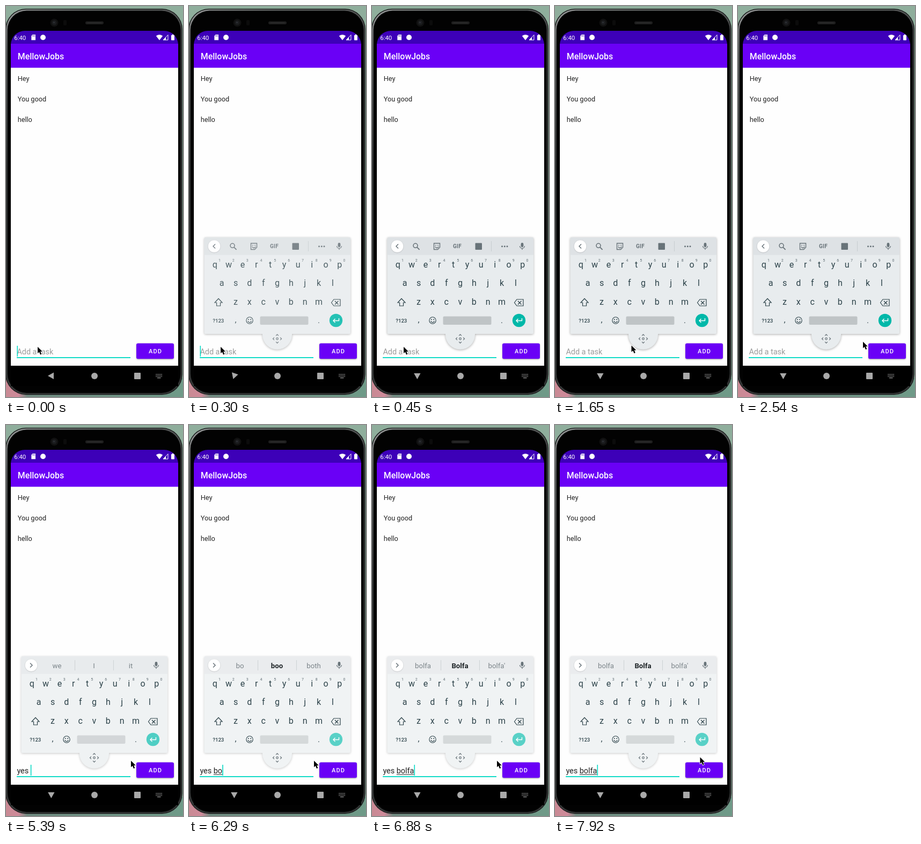
These frames come from a looping animation (330x725 px, 8 s). An HTML page with a canvas:

```html
<!DOCTYPE html>
<html lang="en">
<head>
<meta charset="utf-8">
<title>To-do list</title>
<style>
html, body { margin: 0; width: 100%; height: 100%; overflow: hidden; background: #8fae9c; }
canvas { display: block; width: 330px; height: 725px; }
</style>
</head>
<body>
<canvas id="stage"></canvas>
<script>
const W = 330, H = 725, LOOP = 8000;
const ratio = window.devicePixelRatio || 1;
const FONT = 'Roboto, "Noto Sans", sans-serif';
const PURPLE = '#6a00f6', TEAL = '#14dbc8', INK = '#2c4249', ICON = '#687379';

function layer(canvas) {
  canvas.width = W * ratio;
  canvas.height = H * ratio;
  const ctx = canvas.getContext('2d');
  ctx.scale(ratio, ratio);
  return ctx;
}
const screen = layer(document.getElementById('stage'));
const keys = layer(document.createElement('canvas'));
let c = screen;

// Timelines: [start in ms, value]
const typed = [[0, ''], [4490, 'ye'], [4790, 'yes'], [5240, 'yes '], [5690, 'yes b'],
  [6290, 'yes bo'], [6440, 'yes bol'], [6590, 'yes bolf'], [6880, 'yes bolfa']];
const caret = [[0, 1], [450, 0], [900, 1], [1500, 0], [1950, 1], [2540, 0], [2990, 1],
  [3440, 0], [4040, 1], [7330, 0], [7780, 1]];
const hints = [[0, null], [4940, ['yes', '*yes', 'Yes']], [5240, ['we', 'I', 'it']],
  [5840, ['be', '*but', 'by']], [6290, ['bo', '*boo', 'both']],
  [6440, ['bol', '*bold', 'bolt']], [6590, ['bolf', '*bold', 'bolt']],
  [6880, ['bolfa', '*Bolfa', "bolfa'"]]];
const keyAlpha = [[0, 0], [150, 0.35], [300, 0.85], [450, 1]];
const paleness = [[0, 0], [5240, 0.15], [5390, 0.31], [5540, 0.35]];
const backTurn = [[0, 0], [150, 0.3], [300, 0.8], [450, 1]];
const pointer = [[0, [58.5, 631.5]], [1500, [78, 632]], [1650, [142, 629]], [1800, [212, 624]],
  [1950, [232.5, 622]], [7780, [254, 618]], [7920, [270, 615.5]]];

function at(line, t) {
  let value = line[0][1];
  for (const [start, v] of line) if (t >= start) value = v;
  return value;
}

function box(x, y, w, h, r, fill) {
  c.beginPath();
  c.roundRect(x, y, w, h, r);
  c.fillStyle = fill;
  c.fill();
}
function disc(x, y, r, fill) {
  c.beginPath();
  c.arc(x, y, r, 0, 7);
  c.fillStyle = fill;
  c.fill();
}
function ring(x, y, r, color, width) {
  c.beginPath();
  c.arc(x, y, r, 0, 7);
  c.strokeStyle = color;
  c.lineWidth = width;
  c.stroke();
}
function trace(points, close) {
  c.beginPath();
  for (let i = 0; i < points.length; i += 2) c.lineTo(points[i], points[i + 1]);
  if (close) c.closePath();
}
function poly(points, fill) {
  trace(points, true);
  c.fillStyle = fill;
  c.fill();
}
function line(points, color, width, close) {
  trace(points, close);
  c.strokeStyle = color;
  c.lineWidth = width;
  c.stroke();
}
function text(str, x, y, size, color, weight = 400, align = 'left', spacing = 0) {
  c.font = `${weight} ${size}px ${FONT}`;
  c.letterSpacing = spacing + 'px';
  c.textAlign = align;
  c.fillStyle = color;
  c.fillText(str, x, y);
  c.letterSpacing = '0px';
}
function shadow(color, blur, dy) {
  c.shadowColor = color;
  c.shadowBlur = blur * ratio;
  c.shadowOffsetY = dy * ratio;
}
function noShadow() { shadow('transparent', 0, 0); }

// Mixes an rgb triple with white.
function pale(rgb, amount) {
  return `rgb(${rgb.map(v => Math.round(v + (255 - v) * amount))})`;
}
function gradient(x, y, stops) {
  const g = c.createLinearGradient(0, 0, x, y);
  stops.forEach(([pos, color]) => g.addColorStop(pos, color));
  return g;
}

function drawPhone() {
  c.fillStyle = '#8fae9c';
  c.fillRect(0, 0, W, H);
  c.fillStyle = gradient(W, 0, [[0, '#c98a94'], [0.07, '#cf8a9a'], [0.12, '#6f8a80'], [1, '#6f9a88']]);
  c.fillRect(0, 690, W, 35);
  box(-1, 5, 330, 716, 38, '#1d1f1f');
  box(0.5, 6.5, 327, 713, 37, gradient(120, 240, [[0, '#a2a4a4'], [0.3, '#6a6c6c'], [1, '#3b3d3d']]));
  box(2.5, 8.5, 323.5, 709.5, 36, '#0b0c0c');
  box(4, 10, 320.5, 706.5, 35, '#020202');
  disc(90, 31, 7.5, '#101010');
  disc(90, 31, 4.5, '#1b1c1e');
  disc(89.5, 30.5, 1.6, '#2e3136');
  box(107, 26, 6, 10, 2, '#0b0b0b');
  box(148, 28.5, 34, 5.5, 2.7, '#1e1e1e');
  box(151, 30.5, 28, 1.5, 0.7, '#2c2c2c');
}

function drawStatus() {
  box(9, 46, 312, 26, [26, 26, 0, 0], '#3d00b8');
  text('6:40', 15.3, 62.6, 11.4, '#fff', 400);
  poly([49.5, 53, 55, 53, 55, 63.2, 47.3, 63.2, 47.3, 55.5], '#fff');
  for (const x of [49.4, 51.2, 53]) box(x, 54.3, 0.8, 2.2, 0, '#3d00b8');
  disc(69, 58.3, 5, '#fff');
  c.beginPath();
  c.moveTo(286, 63.5);
  c.lineTo(279.8, 55.6);
  c.quadraticCurveTo(286, 50.8, 292.2, 55.6);
  c.fillStyle = '#fff';
  c.fill();
  line([302, 53.6, 302, 63, 293, 63], '#fff', 1, true);
  poly([298, 57.6, 298, 63, 293, 63], '#fff');
  box(308, 54, 6, 9.6, 0.8, '#fff');
  box(309.7, 52.7, 2.6, 2, 0, '#fff');
}

function drawApp() {
  c.fillStyle = '#fefefe';
  c.fillRect(9, 70, 312, 597);
  c.fillStyle = PURPLE;
  c.fillRect(9, 70, 312, 44.5);
  text('MellowJobs', 21.8, 98.7, 15.9, '#fff', 500);
  ['Hey', 'You good', 'hello'].forEach((item, i) =>
    text(item, 21.7, 138.6 + 38.1 * i, 12.7, '#222'));
  shadow('rgba(0,0,0,.35)', 2.5, 1);
  box(243, 625.4, 70, 28.8, 3, PURPLE);
  noShadow();
  text('ADD', 266, 644, 11.1, '#fff', 500, 'left', 1);
}

function drawInput(t) {
  const str = at(typed, t), x = 20.4, size = 14.4;
  c.fillStyle = TEAL;
  c.fillRect(20, 651, 212, 2);
  if (!str) text('Add a task', x, 646, size, '#9b9b9b');
  text(str, x, 646, size, '#222');
  const end = x + c.measureText(str).width;
  const word = str.lastIndexOf(' ') + 1;
  if (word < str.length) {
    const start = x + c.measureText(str.slice(0, word)).width;
    c.fillRect(start, 647.6, end - start, 1);
  }
  if (at(caret, t)) {
    c.fillStyle = TEAL;
    c.fillRect(end, 630, 1.7, 20);
  }
}

function drawNav(t) {
  const gray = '#a9a9a9', dim = '#9a9a9a';
  c.fillStyle = '#000';
  c.fillRect(9, 667, 312, 38);
  c.save();
  c.translate(84.3, 685.7);
  c.rotate(-Math.PI / 2 * at(backTurn, t));
  poly([-6.3, 0, 4.7, -6.2, 4.7, 6.2], gray);
  c.restore();
  disc(165, 686, 6, gray);
  box(239, 680, 12, 12, 1, gray);
  for (let row = 0; row < 3; row++)
    for (let i = 0; i < 6; i++) box(279.3 + i * 2.1, 682.2 + row * 2.2, 1.2, 1.2, 0, dim);
  box(282, 689, 6.5, 1.2, 0, dim);
}

function drawTools() {
  line([49, 441.5, 45, 445.5, 49, 449.5], ICON, 1.5);
  ring(81, 444.3, 4, ICON, 1.6);
  line([84, 447.3, 88.5, 451.8], ICON, 1.8);
  line([115.5, 440, 126.5, 440, 126.5, 447.5, 122.5, 451.5, 115.5, 451.5], ICON, 1.4, true);
  disc(118.8, 443.7, 0.9, ICON);
  disc(123.2, 443.7, 0.9, ICON);
  c.beginPath();
  c.arc(121, 445.5, 3, 0.2, 2.94);
  c.stroke();
  text('GIF', 159, 449.2, 10, ICON, 700, 'center', 0.3);
  box(192.5, 439.5, 12.5, 12.5, 1, ICON);
  c.fillStyle = '#c7cdd0';
  c.fillRect(222, 436, 1, 19);
  for (const x of [242.5, 247.3, 252]) disc(x, 445.7, 1.5, ICON);
}

function drawHints(words) {
  line([45, 441.5, 49, 445.5, 45, 449.5], ICON, 1.5);
  words.forEach((word, i) => {
    const bold = word[0] === '*';
    text(bold ? word.slice(1) : word, [95, 164, 232.5][i], 451, 13.2,
      bold ? '#1d2326' : '#7b8489', bold ? 700 : 400, 'center');
  });
  c.fillStyle = '#cdd2d4';
  c.fillRect(128, 436, 1, 19);
  c.fillRect(200, 436, 1, 19);
}

function drawKeyIcons(fade) {
  // microphone
  box(277.6, 439, 4.8, 8.2, 2.4, ICON);
  c.beginPath();
  c.arc(280, 445, 4.4, 0, Math.PI);
  c.strokeStyle = ICON;
  c.lineWidth = 1.3;
  c.stroke();
  line([280, 449.4, 280, 452], ICON, 1.3);
  // shift
  line([55, 542.5, 62, 550, 58.5, 550, 58.5, 556, 51.5, 556, 51.5, 550, 48, 550], INK, 1.2, true);
  // backspace
  line([265.5, 550, 270, 544, 282, 544, 282, 556, 270, 556], INK, 1.2, true);
  line([272, 547, 278.5, 553.5], INK, 1.2);
  line([278.5, 547, 272, 553.5], INK, 1.2);
  // smiley
  ring(113, 583, 6.2, INK, 1.1);
  disc(110.8, 581.2, 1, INK);
  disc(115.2, 581.2, 1, INK);
  c.beginPath();
  c.arc(113, 583.6, 3.2, 0.2, 2.94);
  c.lineWidth = 1.2;
  c.stroke();
  // enter
  disc(274, 583, 12.2, pale([0, 184, 169], fade));
  line([279.5, 579, 279.5, 583.5, 269, 583.5], '#fff', 1.4);
  line([272.5, 580, 269, 583.5, 272.5, 587], '#fff', 1.4);
  // move handle
  ring(164.5, 617, 1.8, ICON, 1.2);
  for (let i = 0; i < 4; i++) {
    c.save();
    c.translate(164.5, 617);
    c.rotate(i * Math.PI / 2);
    line([-2.4, -5.6, 0, -8, 2.4, -5.6], ICON, 1.3);
    c.restore();
  }
}

function drawKeyboard(t) {
  const alpha = at(keyAlpha, t), fade = at(paleness, t);
  if (!alpha) return;
  c = keys;
  c.clearRect(0, 0, W, H);
  shadow(`rgba(0,0,0,${0.32 * (1 - fade)})`, 4, 1);
  c.beginPath();
  c.roundRect(28.5, 429, 272.5, 179, 2);
  c.moveTo(192, 608);
  c.arc(164.5, 609.3, 27.5, 0, Math.PI);
  c.lineTo(137, 608);
  c.closePath();
  c.fillStyle = pale([232, 236, 238], fade);
  c.fill();
  noShadow();
  box(28.5, 429, 272.5, 32.5, [2, 2, 0, 0], pale([222, 226, 229], fade));
  shadow('rgba(0,0,0,.2)', 2, 0.6);
  disc(47, 445.5, 11.3, '#fff');
  noShadow();

  const words = at(hints, t);
  if (words) drawHints(words);
  else drawTools();

  const rows = [['qwertyuiop', 48.3, 485], ['asdfghjkl', 61.2, 519.3], ['zxcvbnm', 87, 554]];
  for (const [letters, x, y] of rows)
    [...letters].forEach((ch, i) => text(ch, x + i * 25.83, y, 16, INK, 400, 'center'));
  for (let i = 0; i < 10; i++)
    text((i + 1) % 10, 57 + i * 25.83, 473.8, 7, '#5d6a71', 400, 'center');
  text('?123', 54.8, 587, 9.6, INK, 500, 'center');
  text(',', 87, 587, 15, INK, 400, 'center');
  text('.', 242, 588, 15, INK, 400, 'center');
  box(132.5, 575.5, 90, 15.5, 2, pale([191, 196, 198], fade));
  drawKeyIcons(fade);

  c = screen;
  c.globalAlpha = alpha;
  c.drawImage(keys.canvas, 0, 0, W, H);
  c.globalAlpha = 1;
}

function drawPointer(t) {
  const [x, y] = at(pointer, t);
  c.save();
  c.translate(x, y);
  c.lineJoin = 'round';
  const arrow = [0.5, 0.5, 0.5, 12.5, 3.4, 10, 5.5, 15, 7.8, 14, 5.7, 9.2, 9.4, 9.2];
  line(arrow, '#fff', 1.8, true);
  poly(arrow, '#000');
  c.restore();
}

function draw(t) {
  drawPhone();
  drawStatus();
  drawApp();
  drawInput(t);
  drawNav(t);
  drawKeyboard(t);
  drawPointer(t);
}

const begin = performance.now();
function tick() {
  draw((performance.now() - begin) % LOOP);
  requestAnimationFrame(tick);
}
tick();
</script>
</body>
</html>
```
